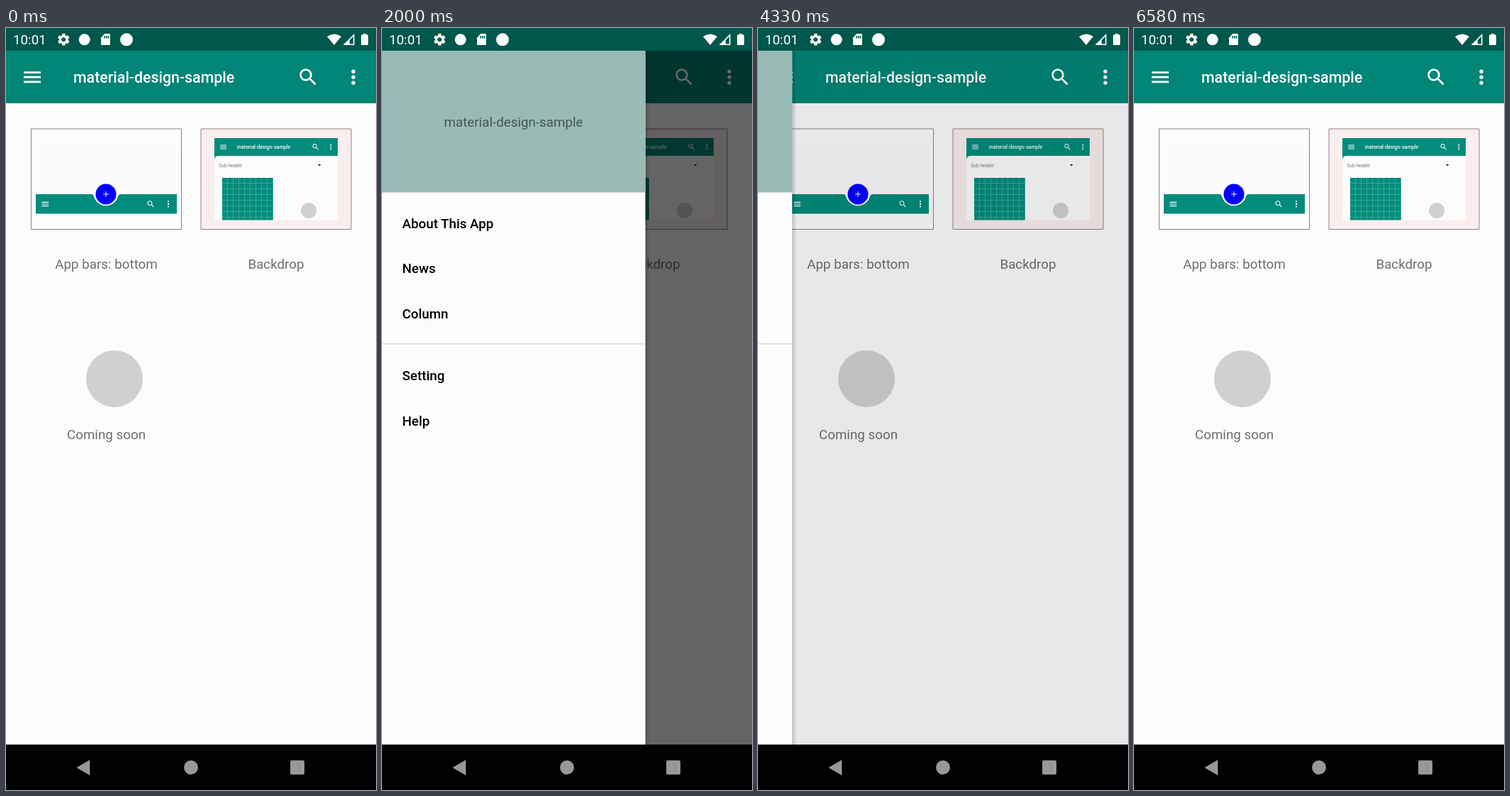
Write an HTML page that moves like this. It is 522 by 1073 pixels and loops after 6.62 s.

```html
<!DOCTYPE html>
<html lang="en">
<head>
<meta charset="utf-8">
<title>Navigation drawer</title>
<style>
  html, body { margin: 0; width: 100%; height: 100%; overflow: hidden; background: #000; }
  svg { display: block; width: 522px; height: 1073px; font: 18.8px Roboto, sans-serif; }
  .mid { text-anchor: middle; }
  .medium { font-weight: 500; }
</style>
</head>
<body>
<svg viewBox="0 0 522 1073">
  <defs>
    <!-- 24-unit icons centred on the origin -->
    <path id="menu" d="M-9-6h18v2h-18zM-9-1h18v2h-18zM-9 4h18v2h-18z"/>
    <path id="search" transform="translate(-12 -12)" d="M15.5 14h-.79l-.28-.27C15.41 12.59 16 11.11 16 9.5 16 5.91 13.09 3 9.5 3S3 5.91 3 9.5 5.91 16 9.5 16c1.61 0 3.09-.59 4.23-1.57l.27.28v.79l5 4.99L20.49 19l-4.99-5zm-6 0C7.01 14 5 11.99 5 9.5S7.01 5 9.5 5 14 7.01 14 9.5 11.99 14 9.5 14z"/>
    <g id="more"><circle cy="-6" r="2"/><circle r="2"/><circle cy="6" r="2"/></g>
    <path id="gear" transform="translate(-12 -12)" d="M19.14 12.94c.04-.3.06-.61.06-.94 0-.32-.02-.64-.07-.94l2.03-1.58c.18-.14.23-.41.12-.61l-1.92-3.32c-.12-.22-.37-.29-.59-.22l-2.39.96c-.5-.38-1.03-.7-1.62-.94l-.36-2.54c-.04-.24-.24-.41-.48-.41h-3.84c-.24 0-.43.17-.47.41l-.36 2.54c-.59.24-1.13.57-1.62.94l-2.39-.96c-.22-.08-.47 0-.59.22L2.74 8.87c-.12.21-.08.47.12.61l2.03 1.58c-.05.3-.09.63-.09.94s.02.64.07.94l-2.03 1.58c-.18.14-.23.41-.12.61l1.92 3.32c.12.22.37.29.59.22l2.39-.96c.5.38 1.03.7 1.62.94l.36 2.54c.05.24.24.41.48.41h3.84c.24 0 .44-.17.47-.41l.36-2.54c.59-.24 1.13-.56 1.62-.94l2.39.96c.22.08.47 0 .59-.22l1.92-3.32c.12-.22.07-.47-.12-.61l-2.01-1.58zM12 15.6c-1.98 0-3.6-1.62-3.6-3.6s1.62-3.6 3.6-3.6 3.6 1.62 3.6 3.6-1.62 3.6-3.6 3.6z"/>
    <pattern id="grid" x="305" y="211" width="8" height="8" patternUnits="userSpaceOnUse">
      <path fill="#018c7c" d="M0 0h8v8H0z"/>
      <path fill="none" stroke="#4fb0a4" stroke-width=".7" d="M0 7.5h8M7.5 0v8"/>
    </pattern>
    <linearGradient id="edge">
      <stop stop-opacity=".2"/><stop offset="1" stop-opacity="0"/>
    </linearGradient>
  </defs>

  <path fill="#fcfcfd" d="M0 32h522v977H0z"/>
  <path fill="#008577" d="M0 32h522v74H0z"/>
  <g fill="#fff">
    <use href="#menu" transform="translate(37 69.2) scale(1.33)"/>
    <text class="medium" x="95" y="77" font-size="21.4">material-design-sample</text>
    <use href="#search" transform="translate(426.3 69.2) scale(1.33)"/>
    <use href="#more" transform="translate(490 69.2) scale(1.33)"/>
  </g>

  <!-- bottom app bar card -->
  <path fill="#fdfdfd" stroke="#858388" d="M35.5 142h212v141.500h-212z"/>
  <path fill="#fbfafd" d="M42 164h199v70H42z"/>
  <path fill="#018c7c" d="M42 234h78q3 0 4 3a17.500 17.500 0 0 0 34 0q1-3 4-3h79v27.500H42z"/>
  <circle cx="141" cy="234" r="14.5" fill="#00f"/>
  <path fill="none" stroke="#fff" d="M137 234h8M141 230v8"/>
  <g fill="#fff">
    <use href="#menu" transform="translate(55.3 248) scale(.53)"/>
    <use href="#search" transform="translate(204.3 248) scale(.53)"/>
    <use href="#more" transform="translate(229 248) scale(.58)"/>
  </g>

  <!-- backdrop card -->
  <path fill="#faeeee" stroke="#858388" d="M275 142h212v141.500H275z"/>
  <path fill="#018c7c" d="M294 155h174v32H294z"/>
  <path fill="#fcfcfc" d="M294 270.500V186q0-6 6-6h168v90.500z"/>
  <g fill="#fff">
    <use href="#menu" transform="translate(306.500 167.500) scale(.48)"/>
    <text class="medium" x="325.5" y="170" font-size="7.15">material-design-sample</text>
    <use href="#search" transform="translate(436.700 167.500) scale(.49)"/>
    <use href="#more" transform="translate(458.300 167.500) scale(.5)"/>
  </g>
  <text x="300.5" y="195.5" font-size="6.5" fill="#777">Sub header</text>
  <path d="M440 192h4.400l-2.200 2.300z"/>
  <path fill="url(#grid)" d="M305 211h72v59.500h-72z"/>
  <circle cx="427" cy="257" r="11" fill="#d0d0d1"/>

  <circle cx="153" cy="494" r="40" fill="#d0d0d1"/>
  <g class="mid" fill="#6e6e70">
    <text x="141.500" y="339">App bars: bottom</text>
    <text x="381" y="339">Backdrop</text>
    <text x="141.500" y="578.500">Coming soon</text>
  </g>

  <path id="scrim" d="M0 32h522v977H0z"/>

  <g id="drawer">
    <path fill="url(#edge)" d="M372 32h6v977h-6z"/>
    <path fill="#fcfcfd" d="M0 32h372v977H0z"/>
    <path fill="#99bbb6" d="M0 32h372v199.500H0z"/>
    <text class="mid" x="186" y="139" fill="#455553">material-design-sample</text>
    <path stroke="#dbdae1" stroke-width="1.4" d="M0 444.700h372"/>
    <g class="medium">
      <text x="29" y="281.500">About This App</text>
      <text x="29" y="345.300">News</text>
      <text x="29" y="409">Column</text>
      <text x="29" y="495.700">Setting</text>
      <text x="29" y="559.500">Help</text>
    </g>
  </g>

  <!-- system bars -->
  <path fill="#00574b" d="M0 0h522v32H0z"/>
  <g fill="#fff">
    <text x="10" y="23">10:01</text>
    <use href="#gear" transform="translate(81.300 16.300) scale(.86)"/>
    <circle cx="110.700" cy="16.300" r="8"/>
    <path fill-rule="evenodd" d="M139.500 8h6q1.500 0 1.500 1.500v13q0 1.500-1.500 1.500h-10q-1.500 0-1.500-1.500v-9zM138.500 11v3.500h1.600V11zm2.600 0v3.500h1.600V11zm2.600 0v3.500h1.600V11z"/>
    <circle cx="170" cy="16.300" r="9"/>
    <path d="M453 12q10-7 20 0l-10 12z"/>
    <path fill-rule="evenodd" d="M491.500 8v16H475.500zM489.900 12l-5 5v5.400h5z"/>
    <path d="M504 8h4v1.500h2q1 0 1 1v12.500q0 1-1 1h-8q-1 0-1-1V10.500q0-1 1-1h2z"/>
  </g>
  <path d="M0 1009h522v64H0z"/>
  <g fill="#989898">
    <path d="M99.500 1041.500l18.800-11v22z"/>
    <circle cx="261" cy="1041.300" r="10"/>
    <rect x="401" y="1031.300" width="20" height="20" rx="2"/>
  </g>

  <g id="touch">
    <circle r="16.5" fill="#6f8f96" opacity=".25"/>
    <circle r="14.5" fill="#dfe9e8" fill-opacity=".92" stroke="#9fb4c6" stroke-width="1.6"/>
  </g>
</svg>
<script>
const LOOP = 6620, WIDTH = 372;
const TAP = 1540, OPEN = 1625, OPEN_TIME = 512;
const DOWN = 4060, DRAG = 4090, RELEASE = 4260;
const SPEED = 175 / 120, START_X = 295, SLOP = 13;

const scrim = document.getElementById('scrim');
const drawer = document.getElementById('drawer');
const touch = document.getElementById('touch');

const clamp = (v, lo, hi) => Math.min(hi, Math.max(lo, v));
const settle = u => 1 + (clamp(u, 0, 1) - 1) ** 5;
const fingerX = t => START_X - SPEED * (clamp(t, DRAG, RELEASE) - DRAG);
const draggedEdge = t => WIDTH - Math.max(0, START_X - SLOP - fingerX(t));

// Right edge of the drawer
function edgeAt(t) {
  if (t < DRAG) return WIDTH * settle((t - OPEN) / OPEN_TIME);
  const edge = draggedEdge(t);
  if (t < RELEASE) return edge;
  return edge * (1 - settle((t - RELEASE) / (4 * edge / SPEED)));
}

function touchAt(t) {
  if (t >= TAP && t < OPEN) return [37, 69];
  if (t >= DOWN && t < RELEASE) return [fingerX(t), 155];
  return null;
}

function draw(now) {
  const t = now % LOOP, edge = edgeAt(t), point = touchAt(t);
  drawer.setAttribute('transform', `translate(${edge - WIDTH} 0)`);
  drawer.style.display = edge > 0.2 ? '' : 'none';
  scrim.setAttribute('opacity', 0.6 * edge / WIDTH);
  touch.style.display = point ? '' : 'none';
  if (point) touch.setAttribute('transform', `translate(${point})`);
  requestAnimationFrame(draw);
}
draw(0);
</script>
</body>
</html>
```
